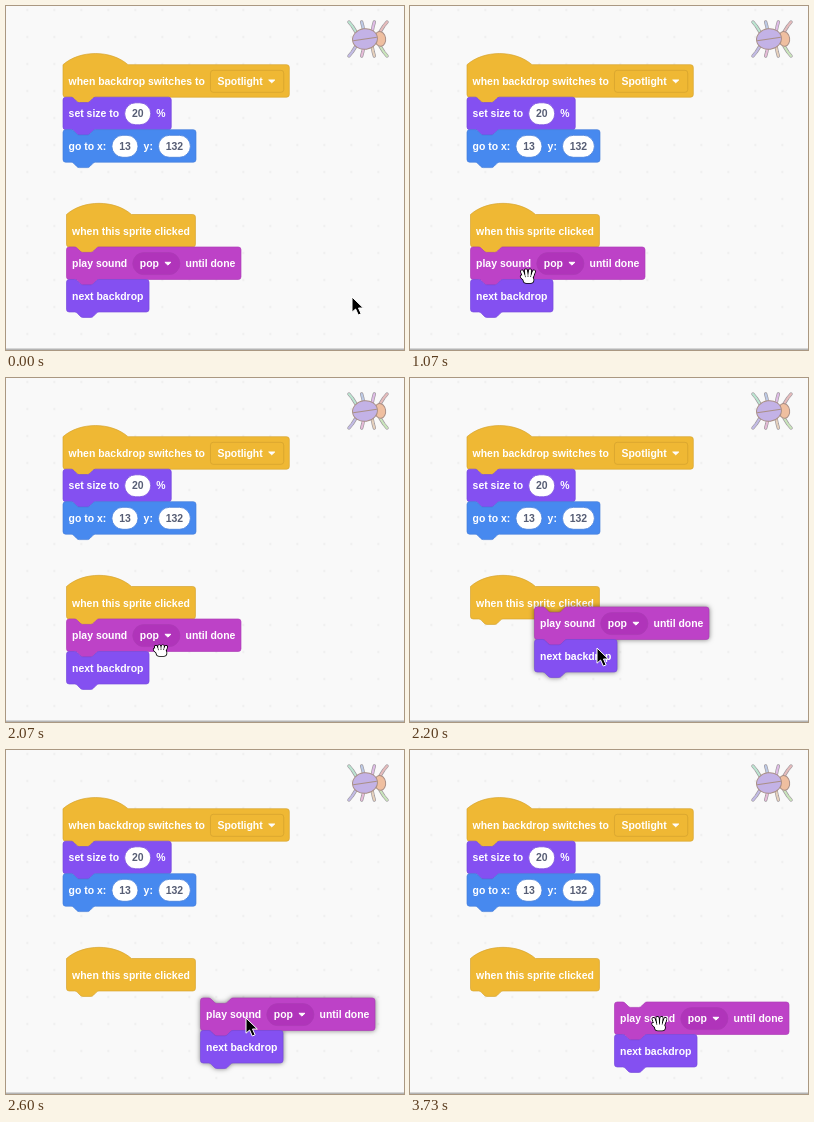
Animation, 398 px wide and 344 px high, one loop 3990 ms. Source, as an HTML page:

```html
<!DOCTYPE html>
<html lang="en">
<meta charset="utf-8">
<title>Dragging blocks</title>
<style>
  html, body { margin: 0; width: 100%; height: 100%; overflow: hidden; background: #f9f9f9; }
  svg { display: block; width: 100%; height: 100%; }
  text { font: bold 10.45px "Liberation Sans", Arial, sans-serif; fill: #fff; }
  text.num { fill: #575e75; }
  .lifted { filter: drop-shadow(0 .5px 2.5px rgba(0, 0, 0, .5)); }
</style>
<svg id="stage" viewBox="0 0 398 344"></svg>
<script>
const SCALE = 0.677, ROW = 32.5, GAP = 5.6;
// Fill, outline and menu fill of each block kind
const COLORS = {
  event: ['#efb834', '#d6a42f', '#efb834'],
  looks: ['#8450f1', '#7649dc'],
  motion: ['#4789ef', '#437ddb'],
  sound: ['#bd42c7', '#ad3cb7', '#b034ba']
};

const ruler = document.createElement('canvas').getContext('2d');
ruler.font = 'bold 10.45px "Liberation Sans", Arial, sans-serif';
const widthOf = s => ruler.measureText(s).width;

// Block outline in editor units, 48 high, with notch and bump
function outline(w, hat) {
  const notch = 'c2 0 3 1 4 2l4 4c1 1 2 2 4 2h12c2 0 3-1 4-2l4-4c1-1 2-2 4-2';
  const bump = 'c-2 0-3 1-4 2l-4 4c-1 1-2 2-4 2h-12c-2 0-3-1-4-2l-4-4c-1-1-2-2-4-2';
  const top = hat ? 'M0 0c25-22 71-22 96 0' : 'M0 4a4 4 0 0 1 4-4h8' + notch;
  return `${top}H${w - 4}a4 4 0 0 1 4 4V44a4 4 0 0 1-4 4H48${bump}H4a4 4 0 0 1-4-4z`;
}

// Each part gives its width and a drawing around the block's middle line
const text = (x, s, cls = '') => `<text class="${cls}" x="${x}" y="3.6">${s}</text>`;
const pill = (x, w, r, fill, stroke) =>
  `<rect x="${x}" y="-11" width="${w}" height="22" rx="${r}" fill="${fill}" stroke="${stroke}" stroke-width=".8"/>`;

const label = s => ({ w: widthOf(s), draw: x => text(x, s) });

function number(s) {
  const w = widthOf(s) + 14.5;
  return { w, draw: (x, c) => pill(x, w, 11, '#fff', c[1]) + text(x + 7.25, s, 'num') };
}

function menu(s, r) {
  const w = widthOf(s) + 28;
  return { w, draw: (x, c) => pill(x, w, r, c[2], c[1]) + text(x + 7, s) +
    `<path d="M${x + w - 15} -1.3h6l-3 2.8z" fill="#fff" stroke="#fff" stroke-linejoin="round"/>` };
}

// Lays the parts out in a row; the block grows to fit
function block([x, y], row, kind, parts, hat) {
  const colors = COLORS[kind];
  let end = GAP, inside = '';
  for (const part of parts) {
    inside += part.draw(end, colors);
    end += part.w + GAP;
  }
  return `<g transform="translate(${x} ${y + row * ROW})">
    <path transform="scale(${SCALE})" d="${outline(end / SCALE, hat)}" fill="${colors[0]}" stroke="${colors[1]}"/>
    <g transform="translate(0 16.6)">${inside}</g></g>`;
}

// The same strokes drawn wide for the edge, then narrower for the inside
const outlined = (d, width, edge, fill, border) =>
  [[edge, width + border], [fill, width]].map(([color, w]) =>
    `<path d="${d}" fill="none" stroke="${color}" stroke-width="${w}" stroke-linecap="round" stroke-linejoin="round"/>`).join('');

function beetle() {
  let legs = '';
  for (let i = 0; i < 4; i++)
    for (const side of [-1, 1]) {
      const lean = i - 1.5;
      legs += outlined(`M${350 + 8 * i} ${33 + side * 7}l${lean * 2.5} ${side * 6}l${lean * 2.2} ${side * 4}`,
        2, '#a09aa0', `hsl(${200 + 70 * i + 50 * side} 45% 82%)`, 1.4);
    }
  return `${legs}<g transform="rotate(-8 359 33)" stroke="#a98f86">
    <ellipse cx="374" cy="35" rx="5.5" ry="7.5" fill="#efbfa0"/>
    <ellipse cx="359" cy="33" rx="12.5" ry="10.3" fill="#c3b2e6"/>
    <path d="M347 33h24"/></g>`;
}

function hand(reach) {
  let fingers = 'M-3 4l-3.2-3.5';
  for (let i = -1.5; i < 2; i++)
    fingers += `M${i * 2.4} 2l${Math.sin(i * .2) * reach} ${(Math.abs(i) * .12 - 1) * reach}`;
  const palm = 'M-1.5 4H2.5';
  return `<g>${outlined(fingers, 2, '#000', '#fff', 1.8)}${outlined(palm, 6, '#000', '#fff', 1.6)}
    ${outlined(fingers, 1.9, 'none', '#fff', 0)}</g>`;
}

const arrow = '<path d="M0 0V15.2l3.6-3.2 2.7 6 2.8-1.2-2.6-5.8h4.8z" stroke="#fff" stroke-linejoin="round"/>';

const upper = [57, 58.7], lower = [60.5, 208.5];

stage.innerHTML = `
  <pattern id="dots" x="7.5" y="17.5" width="27" height="27" patternUnits="userSpaceOnUse">
    <path d="M13 13.5h1.5" stroke="#e6e6e6" stroke-width="1.5"/></pattern>
  <rect width="398" height="344" fill="#f9f9f9"/>
  <rect width="398" height="344" fill="url(#dots)"/>
  <path d="M0 343.3h398" stroke="#b4b4b4" stroke-width="1.4"/>
  ${beetle()}
  ${block(upper, 0, 'event', [label('when backdrop switches to'), menu('Spotlight', 2.7)], true)}
  ${block(upper, 1, 'looks', [label('set size to'), number('20'), label('%')])}
  ${block(upper, 2, 'motion', [label('go to x:'), number('13'), label('y:'), number('132')])}
  ${block(lower, 0, 'event', [label('when this sprite clicked')], true)}
  <g id="drag">
    ${block(lower, 1, 'sound', [label('play sound'), menu('pop', 11), label('until done')])}
    ${block(lower, 2, 'looks', [label('next backdrop')])}
  </g>
  <g id="cursor">${arrow}${hand(8)}${hand(5)}</g>`;

// Turning points as [tick, x, y]; the screen updates 15 times a second
const FPS = 15, LOOP = 3990;
const pointerPath = [[6, 346, 291], [14, 120, 281], [16, 118, 270], [18, 163, 262], [21, 140, 270],
  [25, 104, 284], [29, 106, 262], [31, 155, 271], [35, 219, 269], [39, 240, 268], [42, 249.5, 273.5]];
const dragPath = [[31, 0, 0], [33, 64, -12], [35, 94, 10], [39, 134, 7], [42, 144, 11]];

function at(path, tick) {
  const next = path.findIndex(key => key[0] > tick);
  if (next < 1) return path.at(next).slice(1);
  const [t0, x0, y0] = path[next - 1], [t1, x1, y1] = path[next];
  const u = (tick - t0) / (t1 - t0), ease = u * u * (3 - 2 * u);
  return [x0 + (x1 - x0) * ease, y0 + (y1 - y0) * ease];
}

const ARROW = 0, HAND = 1, GRAB = 2;
function pointerShape(tick) {
  if (tick < 13) return ARROW;
  if (tick < 30) return HAND;
  if (tick < 32) return GRAB;
  return tick < 45 ? ARROW : HAND;
}

const cursor = document.getElementById('cursor'), drag = document.getElementById('drag');
const start = performance.now();
function draw() {
  const time = (performance.now() - start) % LOOP;
  const tick = Math.floor((time + 4) * FPS / 1000);
  const shape = pointerShape(tick);
  cursor.setAttribute('transform', `translate(${at(pointerPath, tick)})`);
  [...cursor.children].forEach((c, i) => c.style.display = i === shape ? '' : 'none');
  drag.setAttribute('transform', `translate(${at(dragPath, tick)})`);
  drag.classList.toggle('lifted', tick >= 32 && tick < 47);
  requestAnimationFrame(draw);
}
draw();
</script>
</html>
```
